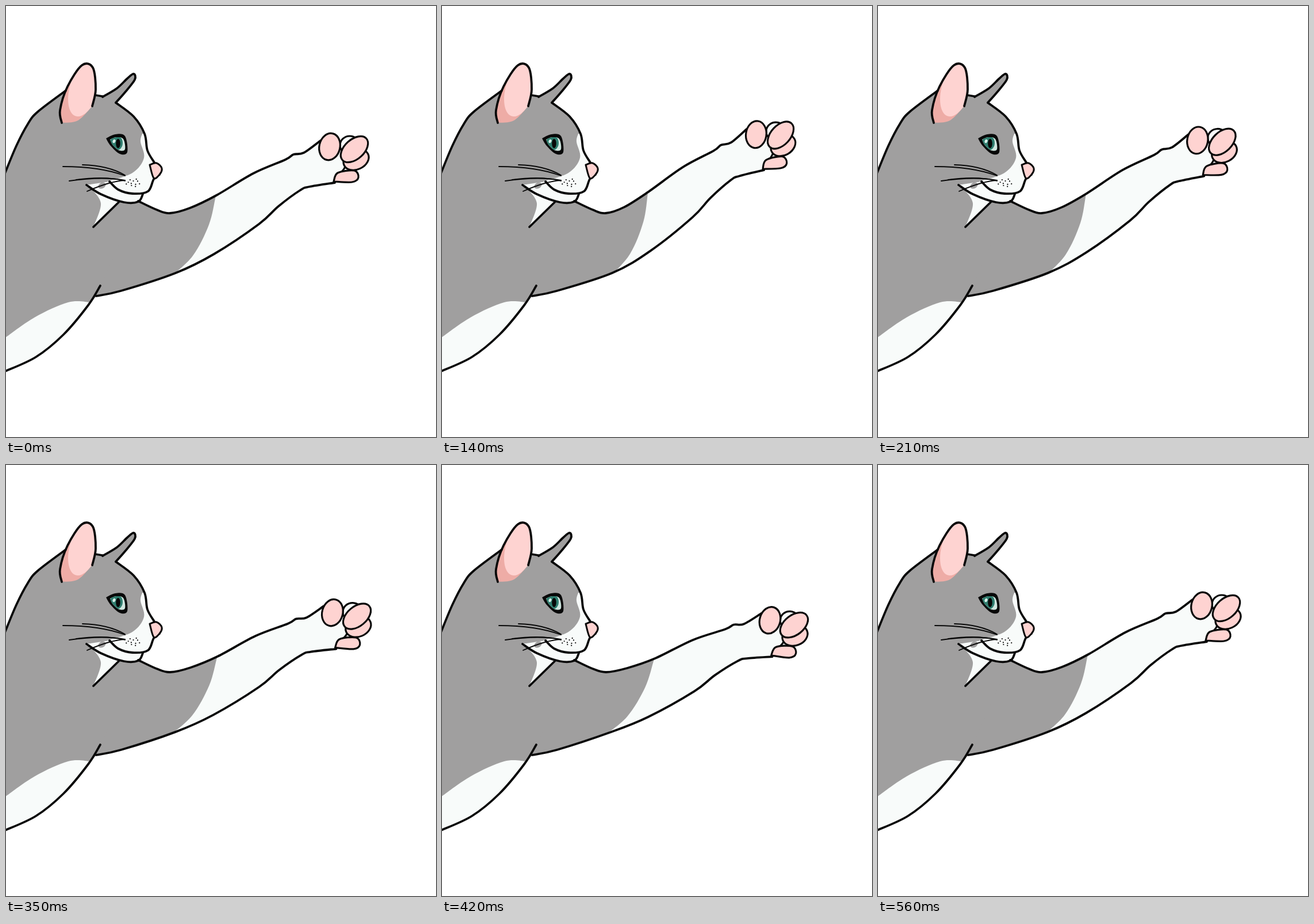
These frames come from a looping animation (748x749 px, 0.63 s). An HTML page with a canvas:

```html
<!DOCTYPE html>
<html lang="en">
<head>
<meta charset="utf-8">
<title>Waving cat</title>
<style>
  html, body { margin: 0; width: 100%; height: 100%; overflow: hidden; background: #fff; }
  canvas { display: block; }
</style>
</head>
<body>
<canvas id="stage" width="748" height="749"></canvas>
<script>
const ctx = document.getElementById('stage').getContext('2d');
const GRAY = '#a09f9f', FUR = '#f8fbfa', PINK = '#fed3d1', ROSE = '#eeaca6', INK = '#080808';
const STEP = 70, STEPS = 9;

// Smooth runs of key points, joined by straight lines.
function curve(...runs) {
  const path = new Path2D();
  runs.forEach((run, i) => {
    const last = run.length / 2 - 1;
    const at = k => {
      const j = 2 * Math.max(0, Math.min(last, k));
      return [run[j], run[j + 1]];
    };
    if (i) path.lineTo(...at(0)); else path.moveTo(...at(0));
    for (let k = 0; k < last; k++) {
      const [a, b, c, d] = [at(k - 1), at(k), at(k + 1), at(k + 2)];
      path.bezierCurveTo(
        b[0] + (c[0] - a[0]) / 6, b[1] + (c[1] - a[1]) / 6,
        c[0] - (d[0] - b[0]) / 6, c[1] - (d[1] - b[1]) / 6, ...c);
    }
  });
  return path;
}

function oval(x, y, rx, ry, deg = 0) {
  const path = new Path2D();
  path.ellipse(x, y, rx, ry, deg * Math.PI / 180, 0, 2 * Math.PI);
  return path;
}

function fill(path, color) {
  ctx.fillStyle = color;
  ctx.fill(path);
}

function line(path, width = 3.8) {
  ctx.strokeStyle = INK;
  ctx.lineWidth = width;
  ctx.stroke(path);
}

function clipped(shape, path, color) {
  ctx.save();
  ctx.clip(shape);
  fill(path, color);
  ctx.restore();
}

// Outlines of the resting cat
const back = [-2, 291, 18, 243, 38, 205, 55, 184, 104, 147];
const ear = [97, 203, 94, 181, 107, 140, 132, 103, 151, 107, 156, 145, 150, 174];
const crown = [156, 155, 168, 157];
const farEar = [168, 158, 193, 143, 211, 126, 222, 118, 224, 128, 207, 150, 191, 168];
const brow = [191, 168, 222, 192, 241, 222, 246, 251, 258, 272];
const mouth = [267, 293, 257, 301, 247, 322, 220, 326, 195, 319, 180, 305];
const chin = [238, 327, 230, 340, 205, 341, 165, 327, 140, 311];
const belly = [164, 486, 143, 520, 100, 571, 52, 610, -2, 635];
const bellyEdge = [-2, 577, 50, 541, 108, 515, 147, 515];
const armTop = [230, 339, 262, 354, 285, 360, 320, 351, 366, 329, 430, 291, 486, 267,
  500, 258, 518, 255, 547, 234];
const armBottom = [572, 307, 528, 314, 512, 320, 474, 348, 440, 379, 362, 431, 295, 464,
  200, 495, 157, 504];
const furEdge = [371, 310, 365, 330, 353, 380, 325, 434, 285, 472];

const bodyFill = curve(back, crown, farEar, brow, mouth.slice(0, 6), chin.slice(0, 4),
  [300, 400], [200, 490], [157, 504], belly.slice(2));
const earFill = curve(ear, [150, 174, 125, 199, 97, 203]);
const muzzle = curve([237, 222, 234, 236, 240, 264, 220, 290, 176, 305],
  mouth.slice().reverse().flatMap((v, i, all) => i % 2 ? [v, all[i - 1]] : []),
  [258, 272], [246, 251, 241, 222]);
const jaw = curve([180, 305, 195, 319, 220, 326, 238, 327], chin);
const throat = curve([146, 315, 165, 343, 152, 384], [196, 341], chin.slice(4));
const nose = curve([250, 276, 262, 273, 271, 282, 267, 293, 257, 299, 250, 276]);

function drawBody() {
  fill(bodyFill, GRAY);
  fill(curve(bellyEdge, belly.slice(2)), FUR);
  fill(throat, FUR);
  fill(jaw, FUR);
  fill(oval(167, 312, 7, 5, -30), GRAY);
  fill(muzzle, FUR);
  fill(earFill, ROSE);
  clipped(earFill, oval(138, 139, 26, 55, 18), PINK);
}

function drawEye() {
  fill(curve([174, 230, 190, 223, 207, 226, 211, 254, 198, 257, 182, 243, 174, 230]), INK);
  const opening = curve([181, 232, 192, 228, 204, 231, 207, 249, 197, 251, 186, 242, 181, 232]);
  fill(opening, '#cfe6df');
  clipped(opening, oval(192, 238, 11, 13), '#2f7d6e');
  fill(oval(195, 239, 3.8, 8), INK);
  fill(oval(188, 235, 2.4, 3.2, 25), '#d9efe9');
}

function whisker(x, y, rootY) {
  const path = new Path2D();
  path.moveTo(x, y);
  path.quadraticCurveTo(x + (207 - x) * 0.6, (y + rootY) / 2 - 8, 207, rootY);
  line(path, 1.8);
}

function drawFreckles() {
  for (let i = 1; i <= 11; i++) {
    const turn = i * 2.4, reach = Math.sqrt(i / 11);
    fill(oval(221 + 14 * reach * Math.cos(turn), 307 + 7 * reach * Math.sin(turn), 1.1, 1.1), INK);
  }
}

function drawFace() {
  for (const run of [back, ear, crown, farEar, brow, mouth, chin, belly, [196, 341, 152, 384]]) {
    line(curve(run));
  }
  fill(nose, PINK);
  line(nose, 3);
  whisker(99, 279, 295);
  whisker(133, 276, 294);
  whisker(110, 304, 303);
  whisker(122, 302, 304);
  whisker(141, 322, 303);
  drawFreckles();
  drawEye();
}

// Swing of the forearm: t runs from -1 (lowered) to 1 (raised).
function swing(t, x, y) {
  const far = (x - 285) / 275, high = (400 - y) / 155;
  return [x - 12 * t * high - 4.5 * t * t * far, y + (2 * t * t - 23 * t) * far];
}

// The swing fades in past the shoulder.
function bend(run, t) {
  const out = [];
  for (let i = 0; i < run.length; i += 2) {
    const [x, y] = [run[i], run[i + 1]];
    const [sx, sy] = swing(t, x, y);
    const mix = Math.max(0, Math.min(1, (x - 270) / 80));
    out.push(x + (sx - x) * mix, y + (sy - y) * mix);
  }
  return out;
}

function swung(t, draw) {
  const [ox, oy] = swing(t, 0, 0), [ax, ay] = swing(t, 1, 0), [bx, by] = swing(t, 0, 1);
  ctx.save();
  ctx.transform(ax - ox, ay - oy, bx - ox, by - oy, ox, oy);
  draw();
  ctx.restore();
}

const armFur = curve(furEdge, [800, 472], [800, 100], [371, 100]);
const palm = curve([535, 255], [547, 234], [565, 232], [604, 250], [591, 276], [585, 288], [574, 306], [540, 304]);
const palmSide = curve([591, 277, 588, 283, 584, 288]);
const knuckle = oval(598, 242, 17, 16);
const toes = [
  oval(563, 244.5, 18, 23.5, 13),
  oval(609, 267, 23, 17, -25),
  oval(606, 249, 28, 17, -42),
  curve([570, 305, 577, 290, 606, 286, 613, 298, 602, 306, 570, 305])
];

function drawArm(t) {
  const top = bend(armTop, t), bottom = bend(armBottom, t);
  const arm = curve(top, bottom);
  fill(arm, GRAY);
  ctx.save();
  ctx.clip(arm);
  swung(t, () => fill(armFur, FUR));
  ctx.restore();
  swung(t, () => fill(palm, FUR));
  line(curve(top));
  line(curve(bottom));
  swung(t, () => {
    line(palmSide, 3.2);
    fill(knuckle, FUR);
    line(knuckle, 3.2);
    for (const toe of toes) {
      fill(toe, PINK);
      line(toe, 3.2);
    }
  });
}

function frame(now) {
  const step = Math.floor(now / STEP) % STEPS;
  const t = 1 - Math.abs((step + 2) % 8 - 4) / 2;
  ctx.fillStyle = '#fff';
  ctx.fillRect(0, 0, 748, 749);
  ctx.lineCap = ctx.lineJoin = 'round';
  drawBody();
  // The triangle above peaks at the raised pose.
  drawArm(t);
  drawFace();
}

let start;
function tick(now) {
  start ??= now;
  frame(Math.max(0, now - start));
  requestAnimationFrame(tick);
}
frame(0);
requestAnimationFrame(tick);
</script>
</body>
</html>
```
